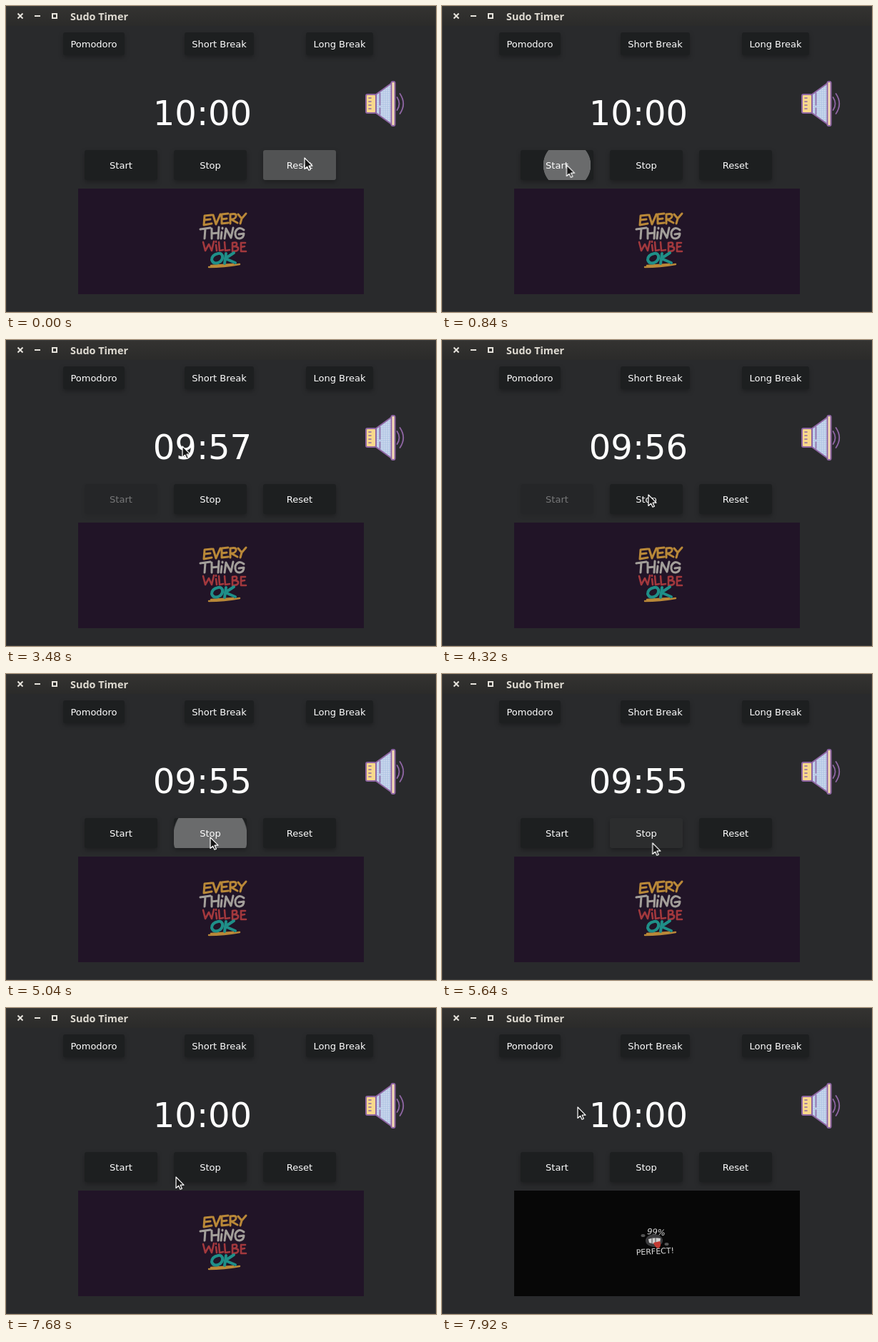
Animation, 602 px wide and 429 px high, one loop 8 s. Source, as an HTML page:

```html
<!DOCTYPE html>
<html lang="en">
<head>
<meta charset="utf-8">
<title>Timer</title>
<style>
html, body { margin: 0; width: 100%; height: 100%; overflow: hidden; background: #292a2c; }
svg { display: block; width: 602px; height: 429px; }
text { font-family: "DejaVu Sans", sans-serif; font-size: 13px; fill: #fff; text-anchor: middle; }
.title { font: bold 14.4px "Noto Sans", "Open Sans", sans-serif; fill: #dfdbd2; text-anchor: start; }
.clock text { font-size: 48px; }
.btn { fill: #1d1f20; filter: drop-shadow(0 3px 3px rgba(0, 0, 0, .28)); }
.line { fill: none; stroke-linecap: round; stroke-linejoin: round; }

/* The loop moves in ticks of 120 ms, which is 1.5 % */
.anim { animation: 8s step-end infinite; }
.tap { fill: #fff; fill-opacity: .34; transform-box: fill-box; transform-origin: center; }

.pointer { animation-name: pointer; }
.clock { animation-name: clock; }
.start-box { animation-name: box-off; }
.start-label { animation-name: label-off; }
.slide { animation-name: slide; }
.tap-last { animation-name: tap-last; }
.tap-start { animation-name: tap-start; }
.tap-stop { animation-name: tap-stop; }
.tap-reset { animation-name: tap-reset; }

@keyframes pointer {
  0% { transform: translate(418px, 213px); animation-timing-function: steps(3); }
  4.5% { transform: translate(326px, 241px); animation-timing-function: steps(3); }
  9%, 36% { transform: translate(174.5px, 223px); }
  36.01% { transform: translate(174.5px, 223px); animation-timing-function: steps(4); }
  42% { transform: translate(230px, 108px); }
  43.5% { transform: translate(247px, 149px); }
  45% { transform: translate(299px, 172px); }
  46.5% { transform: translate(297px, 176px); }
  48% { transform: translate(296px, 178px); }
  52.5% { transform: translate(294px, 192px); }
  54% { transform: translate(289px, 217px); }
  55.5% { transform: translate(286px, 229px); }
  64.5% { transform: translate(286px, 229px); animation-timing-function: steps(5); }
  72% { transform: translate(297px, 239px); }
  79.5% { transform: translate(297px, 239px); animation-timing-function: steps(4); }
  85.5% { transform: translate(384px, 230px); }
  90% { transform: translate(384px, 230px); animation-timing-function: steps(4); }
  96% { transform: translate(238px, 237px); animation-timing-function: steps(2); }
  99%, 100% { transform: translate(190px, 139px); }
}
@keyframes clock {
  0% { transform: none; }
  12% { transform: translateY(-60px); }
  24% { transform: translateY(-120px); }
  36% { transform: translateY(-180px); }
  48% { transform: translateY(-240px); }
  60% { transform: translateY(-300px); }
  87%, 100% { transform: none; }
}
@keyframes box-off {
  0%, 63%, 100% { opacity: 1; }
  12% { opacity: .3; }
}
@keyframes label-off {
  0%, 63%, 100% { opacity: 1; }
  12% { opacity: .38; }
}
@keyframes slide {
  0% { opacity: 0; }
  99%, 100% { opacity: 1; }
}
@keyframes tap-last {
  0% { opacity: .7; animation-timing-function: steps(3); }
  4.5%, 100% { opacity: 0; }
}
@keyframes tap-start {
  0% { opacity: 0; transform: scale(0); }
  10.5% { opacity: 1; transform: scale(.49); }
  12% { opacity: 1; transform: scale(1); animation-timing-function: steps(6); }
  21%, 100% { opacity: 0; transform: scale(1); }
}
@keyframes tap-stop {
  0% { opacity: 0; transform: scale(0); }
  63% { opacity: 1; transform: scale(.9); }
  64.5% { opacity: 1; transform: scale(1); animation-timing-function: steps(5); }
  72%, 100% { opacity: 0; transform: scale(1); }
}
@keyframes tap-reset {
  0% { opacity: 0; transform: scale(0); }
  85.5% { opacity: 1; transform: scale(.125); }
  87% { opacity: 1; transform: scale(.93); }
  88.5% { opacity: 1; transform: scale(1); animation-timing-function: steps(4); }
  94.5%, 100% { opacity: 0; transform: scale(1); }
}
</style>
</head>
<body>
<svg viewBox="0 0 602 429">
  <defs>
    <linearGradient id="bar" x2="0" y2="1">
      <stop stop-color="#343331"/>
      <stop offset="1" stop-color="#2b2b2a"/>
    </linearGradient>
    <pattern id="dots" width="3" height="3" patternUnits="userSpaceOnUse">
      <rect width="3" height="3" fill="#b4c8e6"/>
      <circle cx="1.5" cy="1.5" r=".9" fill="#d5dff0"/>
    </pattern>
    <clipPath id="buttons">
      <rect x="110" y="202" width="102" height="42" rx="3"/>
      <rect x="235" y="202" width="102" height="42" rx="3"/>
      <rect x="360" y="202" width="102" height="42" rx="3"/>
    </clipPath>
    <clipPath id="window"><rect x="195" y="120" width="160" height="58"/></clipPath>
  </defs>

  <!-- Window frame -->
  <rect width="602" height="429" fill="#292a2c"/>
  <rect width="602" height="28" fill="url(#bar)"/>
  <rect x=".5" y=".5" width="601" height="428" fill="none" stroke="#3a3a39"/>
  <g fill="none" stroke="#e6e3dc" stroke-width="2">
    <path d="M16.5 10.5l7 7m0-7l-7 7M40 14h8"/>
    <rect x="65" y="11" width="6" height="6"/>
  </g>
  <text class="title" x="90" y="20">Sudo Timer</text>

  <!-- Modes -->
  <rect class="btn" x="80" y="37" width="86" height="32" rx="3"/>
  <rect class="btn" x="250" y="37" width="97" height="32" rx="3"/>
  <rect class="btn" x="420" y="37" width="94" height="32" rx="3"/>
  <text x="123" y="58">Pomodoro</text>
  <text x="298.5" y="58">Short Break</text>
  <text x="467" y="58">Long Break</text>

  <!-- Speaker -->
  <g class="line" stroke="#8f66a4" stroke-width="2">
    <path d="M518 124L540 108V166L518 150Z" fill="url(#dots)"/>
    <rect x="504" y="124" width="14" height="26" rx="2" fill="#f8d98c"/>
    <path d="M508 129h3m-3 5h3m-3 5h3m-3 5h3" stroke-width="1.6"/>
    <path d="M523.5 122v30" stroke-width="1.5" stroke-dasharray="17 4"/>
    <rect x="539.5" y="106" width="5" height="62" rx="2" fill="#f6dfb4"/>
    <path d="M547.5 128Q553.500 137 547.5 146M551.500 123Q561 137 551.500 151" stroke-width="1.8"/>
  </g>

  <!-- Clock -->
  <g clip-path="url(#window)">
    <g class="anim clock">
      <text x="275" y="167">10:00</text>
      <text x="275" y="227">09:59</text>
      <text x="275" y="287">09:58</text>
      <text x="275" y="347">09:57</text>
      <text x="275" y="407">09:56</text>
      <text x="275" y="467">09:55</text>
    </g>
  </g>

  <!-- Controls -->
  <rect class="btn anim start-box" x="110" y="202" width="102" height="42" rx="3"/>
  <rect class="btn" x="235" y="202" width="102" height="42" rx="3"/>
  <rect class="btn" x="360" y="202" width="102" height="42" rx="3"/>
  <g clip-path="url(#buttons)">
    <circle class="tap anim tap-last" cx="418" cy="213" r="67"/>
    <circle class="tap anim tap-start" cx="175" cy="223" r="68"/>
    <circle class="tap anim tap-stop" cx="286" cy="229" r="58"/>
    <circle class="tap anim tap-reset" cx="384.500" cy="232" r="83"/>
  </g>
  <text class="anim start-label" x="161" y="228">Start</text>
  <text x="286" y="228">Stop</text>
  <text x="411" y="228">Reset</text>

  <!-- First picture -->
  <rect x="101" y="256" width="400" height="148" fill="#211427"/>
  <g class="line" stroke-width="3">
    <path stroke="#b98838" d="M288 293L278 294L277 307L288 305M278 300L286 299M290 293L294 306L300 292M311 291L302 292V305L311 304M302 299L309 298M314 305V292Q323 290 322 295Q321 299 315 299L324 304M325 292L330 298L336 291M330 298L328 305"/>
    <path stroke="#a39f9a" d="M272 313L286 311M279 312L278 326M288 312V326M288 319L297 318M298 310L297 326M302 317L301 326M303 311v1M306 326L308 312L315 325L318 311M333 314Q325 308 321 317Q320 326 327 326Q333 325 333 319L326 320"/>
    <path stroke="#a2383d" stroke-width="2.6" d="M276 331L279 343L284 334L288 343L291 330M294 335L295 343M294 330v1M298 331L299 343L304 342M306 331L307 343L313 342M317 344V332Q324 330 323 335Q322 337 318 337Q326 337 325 341Q324 344 317 344M335 332H329V344H336M329 338L334 337"/>
    <path stroke="#b98838" stroke-width="2.4" d="M284 366Q305 366 327 362M287 364L318 362"/>
    <path stroke="#1f8f88" stroke-width="4" d="M297 347Q288 349 288 356Q290 362 297 360Q304 357 303 350Q301 346 297 347M308 347L306 361M319 346L307 354L321 360"/>
  </g>

  <!-- Second picture -->
  <g class="anim slide">
    <rect x="101" y="256" width="400" height="148" fill="#070707"/>
    <text transform="translate(299 318) rotate(4) skewX(-8)" style="font-size:11.5px;fill:#ddd">99%</text>
    <ellipse cx="297" cy="326" rx="12" ry="9" fill="#3b3b3d"/>
    <path d="M289 324Q297 321 306 323L305 330Q297 332 290 329Z" fill="#d2d2d2"/>
    <path d="M294 323v7m5-8v8" stroke="#444" fill="none"/>
    <path d="M296 329L305 327Q308 334 303 337Q298 336 296 329Z" fill="#c23a32"/>
    <ellipse cx="281.500" cy="319" rx="3" ry="2" fill="#555"/>
    <ellipse cx="314.500" cy="331" rx="3" ry="2" fill="#555"/>
    <text transform="translate(298.500 345) rotate(-3)" style="font-size:11px;fill:#ddd">PERFECT!</text>
  </g>

  <!-- Pointer -->
  <path class="anim pointer" d="M0 0V15.500L3.600 12.200L6 17.300L8.400 16.200L6.100 11.200H11Z" fill="#161616" stroke="#fff" stroke-width="1.200" stroke-linejoin="round"/>
</svg>
</body>
</html>
```
